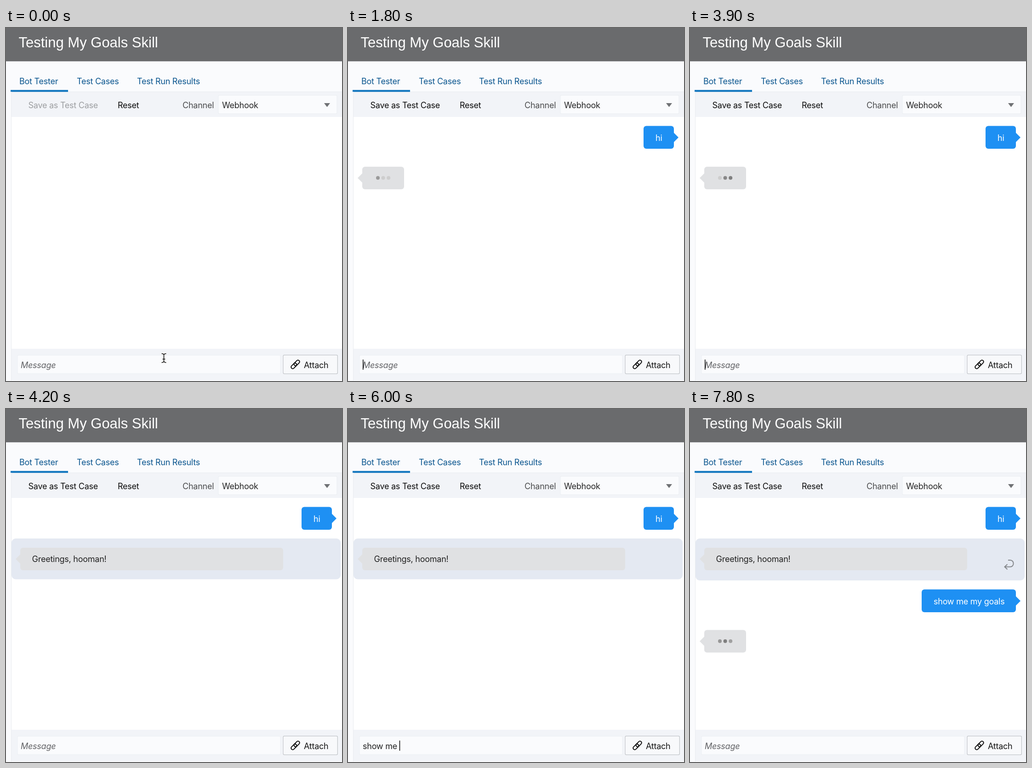
These frames come from a looping animation (731x766 px, 8000 ms). An HTML page with a canvas:

```html
<!DOCTYPE html>
<html lang="en">
<head>
<meta charset="utf-8">
<title>Bot tester</title>
<style>
  html, body { margin: 0; width: 100%; height: 100%; overflow: hidden; background: #fafbfd; }
  canvas { display: block; width: 731px; height: 766px; }
</style>
</head>
<body>
<canvas id="stage"></canvas>
<script>
const W = 731, H = 766, LOOP = 8000, STEP = 300;
const UI = 'Inter, Roboto, sans-serif';
const REQUEST = 'show me my goals';
const SENT_HI = 1500, REPLY = 4200, TYPE_START = 4800, SENT_REQUEST = 7500;

const canvas = document.getElementById('stage');
const ratio = window.devicePixelRatio || 1;
canvas.width = W * ratio;
canvas.height = H * ratio;
const ctx = canvas.getContext('2d');
ctx.scale(ratio, ratio);

function rect(x, y, w, h, color) {
  ctx.fillStyle = color;
  ctx.fillRect(x, y, w, h);
}

function round(x, y, w, h, r, color) {
  ctx.fillStyle = color;
  ctx.beginPath();
  ctx.roundRect(x, y, w, h, r);
  ctx.fill();
}

function poly(points, color) {
  ctx.fillStyle = color;
  ctx.beginPath();
  points.forEach(([x, y]) => ctx.lineTo(x, y));
  ctx.fill();
}

function stroke(path, color, width) {
  ctx.strokeStyle = color;
  ctx.lineWidth = width;
  ctx.stroke(new Path2D(path));
}

function text(str, x, y, color, font = `18px ${UI}`, spacing = -0.25) {
  ctx.font = font;
  ctx.letterSpacing = spacing + 'px';
  ctx.fillStyle = color;
  ctx.fillText(str, x, y);
  return ctx.measureText(str).width;
}

function drawHeader(canSave) {
  rect(0, 0, W, H, '#fafbfd');
  rect(0, 0, W, 72, '#6a6b6d');
  rect(0, 72, W, 1, '#cfd0d3');
  text('Testing My Goals Skill', 27.5, 41.5, '#fff', '31px "Liberation Sans", Arial, sans-serif', 0);

  text('Bot Tester', 29, 122, '#0b568f');
  text('Test Cases', 154, 122, '#0b568f');
  text('Test Run Results', 285, 122, '#0b568f');

  rect(11, 138, 720, 55, '#f2f4f8');
  rect(11, 138, 720, 1, '#e9ecf0');
  rect(10, 134.5, 125, 4, '#0b73bd');
  text('Save as Test Case', 48.5, 174, canSave ? '#0c0c0c' : '#9c9ea1');
  text('Reset', 243, 174, '#0c0c0c');
  text('Channel', 384, 174, '#4b4c4e');
  round(461.5, 145.5, 259, 41, 2, '#ebeef2');
  round(462.5, 146.5, 257, 39, 2, '#fafbfd');
  text('Webhook', 470, 174, '#262626');
  poly([[692, 163], [705, 163], [698.5, 171.5]], '#6f7174');

  rect(11, 193, 720, 503, '#fff');
  rect(11, 138, 1, 627, '#e8ebef');
}

function drawLinkIcon() {
  ctx.save();
  ctx.translate(629.5, 730);
  ctx.rotate(-Math.PI / 4);
  ctx.strokeStyle = '#111';
  ctx.lineWidth = 2;
  for (const x of [-11.5, -2.5]) {
    ctx.beginPath();
    ctx.roundRect(x, -3.5, 14, 7, 3.2);
    ctx.stroke();
  }
  ctx.restore();
}

function drawFooter(typed, caret) {
  rect(12, 696, 719, 68, '#f2f4f8');
  round(24.5, 709.5, 573, 41, 2, '#eceff3');
  round(25.5, 710.5, 571, 39, 2, '#fafbfd');
  let end = 0;
  if (typed) end = text(typed, 32, 738, '#222');
  else text('Message', 32, 738, '#626366', `italic 18px ${UI}`);
  if (caret) rect(32 + end, 719.5, 1.5, 22, '#000');

  round(602.5, 709, 119.5, 42, 3, '#c3c6ca');
  round(603.7, 710.2, 117, 39.6, 2, '#f8f9fb');
  drawLinkIcon();
  text('Attach', 648, 738, '#161616');
}

function userBubble(x, y, str) {
  round(x, y, 709 - x, 49.5, 6, '#1e90f3');
  poly([[708.5, y + 14.5], [719, y + 25], [708.5, y + 35.5]], '#1e90f3');
  text(str, x + 26, y + 32, '#fff');
}

function botBubble(y, width) {
  round(31, y, width, 49, 6, '#e0e1e3');
  poly([[31.5, y + 14], [21, y + 24.5], [31.5, y + 35]], '#e0e1e3');
}

// Each dot darkens, holds, and fades; the next one follows a little later.
function pulse(u) {
  if (u < 0) return Math.max(0, 1 + u / 264);
  return Math.min(1, Math.max(0, (484 - u) / 220));
}

function typingBubble(y, t, peak) {
  const period = 1500;
  botBubble(y, 91);
  for (let i = 0; i < 3; i++) {
    let u = (t - peak - i * 220) % period;
    if (u < 0) u += period;
    if (u > period - 264) u -= period;
    const g = Math.round(205 - 78 * pulse(u));
    ctx.fillStyle = `rgb(${g},${g},${g})`;
    ctx.beginPath();
    ctx.arc(65 + i * 11.6, y + 24.3, 4, 0, 7);
    ctx.fill();
  }
}

function drawChat(t) {
  if (t < SENT_HI) return;
  const asked = t >= SENT_REQUEST;
  userBubble(643, 212.5, 'hi');
  if (t < REPLY) {
    typingBubble(301, t, 1890);
    return;
  }
  round(12, 281, 716, asked ? 91 : 88.5, 9, '#e4e9f2');
  botBubble(301, 572);
  text('Greetings, hooman!', 56.5, 332, '#222');
  if (asked) {
    stroke('M692 328H696.5C706 328 706 342.5 696.5 342.5H685M690.5 337L684.5 342.5L690.5 348', '#85888c', 2);
    userBubble(504, 391.5, REQUEST);
    typingBubble(479.5, t, 7470);
  }
}

function drawPointer() {
  const beam = 'M338.5 706.5Q342.5 706.5 343.5 709Q344.5 706.5 348.5 706.5M343.5 709V723.5' +
    'M338.5 726Q342.5 726 343.5 723.5Q344.5 726 348.5 726M340.5 718.5H346.5';
  stroke(beam, '#fff', 3.5);
  stroke(beam, '#111', 1.6);
}

function typedText(t) {
  if (t >= 900 && t < SENT_HI) return 'hi'.slice(0, t < 1200 ? 1 : 2);
  if (t < TYPE_START || t >= SENT_REQUEST) return '';
  return REQUEST.slice(0, Math.floor((t - TYPE_START) / STEP * 15 / 7));
}

function caretOn(t, typed) {
  if (typed) return true;
  if (t < SENT_HI) return t >= STEP;
  const since = t < SENT_REQUEST ? t - 1430 : t - 7290;
  return since % 1000 < 500;
}

function draw(now) {
  const t = Math.floor(now % LOOP / STEP) * STEP;
  const typed = typedText(t);
  drawHeader(t >= SENT_HI);
  drawChat(t);
  drawFooter(typed, caretOn(t, typed));
  if (t < 900) drawPointer();
}

const start = performance.now();
function tick() {
  draw(performance.now() - start);
  requestAnimationFrame(tick);
}
tick();
</script>
</body>
</html>
```
